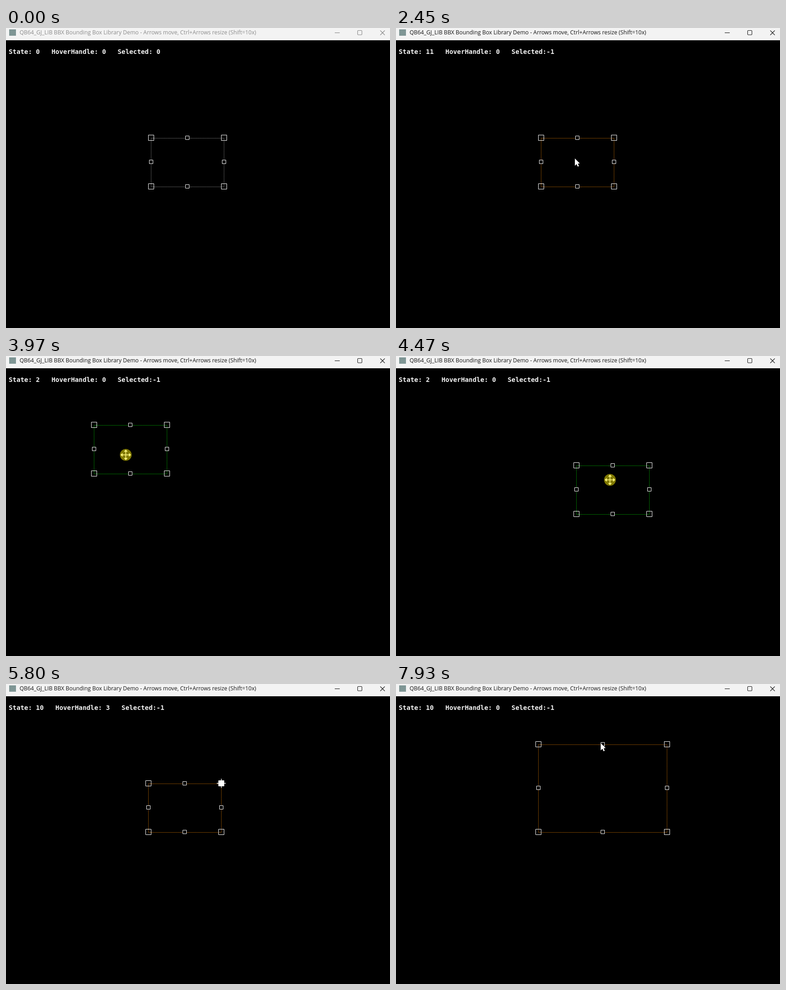
An HTML page with a canvas for the animation above (8000 ms loop, 848 by 660 pixels).

```html
<!DOCTYPE html>
<html lang="en">
<head>
<meta charset="utf-8">
<title>Bounding box demo</title>
<style>
  html, body { margin: 0; width: 100%; height: 100%; overflow: hidden; background: #000; }
  canvas { position: absolute; left: 0; top: 0; }
  #title, #status { position: absolute; line-height: 20px; white-space: pre; }
  #title { left: 30px; top: 0; font-size: 12.3px; font-family: "Open Sans", sans-serif; }
  #status { left: 6px; top: 42px; color: #f4f4f4; font: bold 14.27px/20px "DejaVu Sans Mono", monospace; }
</style>
</head>
<body>
<canvas id="stage" width="848" height="660"></canvas>
<div id="title">QB64_GJ_LIB BBX Bounding Box Library Demo - Arrows move, Ctrl+Arrows resize (Shift=10x)</div>
<div id="status"></div>
<script>
const LOOP = 8000;
const SELECT = 1990, DRAG = 2521, DROP = 5520, RESIZE = 6000, RELEASE = 6750;
const BOX = { width: 161, height: 107 };
const CORNER_START = [475, 218], CORNER_END = [598, 132], BOX_BOTTOM = 325;

const ctx = document.getElementById('stage').getContext('2d');
const title = document.getElementById('title');
const statusLine = document.getElementById('status');

const MODES = {
  idle: { state: 0, color: '#8f8f8f' },
  hover: { state: 1, color: '#e0e0e0', pointer: 'arrow' },
  selected: { state: 10, color: '#d87800', pointer: 'arrow' },
  inside: { state: 11, color: '#d87800', pointer: 'arrow' },
  moving: { state: 2, color: '#00c000', pointer: 'move', pressed: true },
  onHandle: { state: 10, color: '#d87800', pointer: 'cross', handle: 3 },
  resizing: { state: 103, color: '#c800c8', pointer: 'cross', handle: 3, pressed: true },
};
MODES.entering = { ...MODES.idle, pointer: 'arrow' };

const SCRIPT = [
  [0, 'idle'], [200, 'entering'], [1300, 'hover'],
  [SELECT, 'moving'], [2120, 'inside'],
  [DRAG, 'moving'], [DROP, 'inside'],
  [5800, 'onHandle'], [RESIZE, 'resizing'], [RELEASE, 'onHandle'],
  [6890, 'inside'], [7590, 'selected'],
];

const lerp = (a, b, u) => a.map((v, i) => v + (b[i] - v) * u);
const progress = (t, from, to) => Math.min(1, Math.max(0, (t - from) / (to - from)));

// Smooth curve through [time, ...values] keys, at rest at both ends
function track(...keys) {
  const last = keys.length - 1;
  const slope = (i, axis) => i === 0 || i === last ? 0 :
    (keys[i + 1][axis] - keys[i - 1][axis]) / (keys[i + 1][0] - keys[i - 1][0]);
  return time => {
    const t = Math.min(keys[last][0], Math.max(keys[0][0], time));
    const i = Math.max(1, keys.findIndex(k => k[0] >= t)) - 1;
    const a = keys[i], b = keys[i + 1], span = b[0] - a[0], u = (t - a[0]) / span;
    const ease = u * u * (3 - 2 * u);
    return a.map((v, axis) => v + (b[axis] - v) * ease +
      span * u * (1 - u) * (slope(i, axis) * (1 - u) - slope(i + 1, axis) * u)).slice(1);
  };
}

// The box is swung in ellipses: centre x, y and radius x, y over time
const orbit = track(
  [2710, 320, 241, 0, 0],
  [3410, 248, 129, 55, 51],
  [4470, 301, 240, 97, 50],
  [5030, 306, 220, 0, 0],
  [DROP, 314, 218, 0, 0],
);
function boxOrigin(t) {
  const [cx, cy, rx, ry] = orbit(t);
  const angle = (t - 3410) / 848 * Math.PI * 2;
  return [cx + rx * Math.sin(angle), cy + ry * Math.cos(angle)];
}

const boxCorner = t => lerp(CORNER_START, CORNER_END, progress(t, 6130, 6550) ** 1.1);
const approach = track([200, 768, 645], [950, 638, 491], [1440, 394, 288], [2450, 395, 287]);
const toCorner = track([DROP, 393, 263], [5800, ...CORNER_START]);
const depart = track([RELEASE, ...CORNER_END], [7150, 510, 160], [7930, 452, 130]);

// While the button is down, the pointer runs ahead of the box
function pointerAt(t) {
  if (t < DRAG) return approach(t);
  if (t < DROP) {
    const [x, y] = boxOrigin(t + 40);
    return [x + 79, y + 45];
  }
  if (t < RESIZE) return toCorner(t);
  return t < RELEASE ? boxCorner(t + 80) : depart(t);
}

function boxAt(t) {
  const [x, y] = boxOrigin(t).map(Math.round);
  if (t < RESIZE) return [x, y, x + BOX.width, y + BOX.height];
  const [right, top] = boxCorner(t).map(Math.round);
  return [x, top, right, BOX_BOTTOM];
}

function line(...points) {
  ctx.beginPath();
  points.forEach(([x, y]) => ctx.lineTo(x, y));
  ctx.stroke();
}

function polygon(...points) {
  ctx.beginPath();
  points.forEach(([x, y]) => ctx.lineTo(x, y));
  ctx.fill();
}

function drawTitleBar(active) {
  ctx.fillStyle = '#f3f3f3';
  ctx.fillRect(0, 0, 848, 27);
  ctx.fillStyle = '#7f9695';
  ctx.fillRect(7, 3, 15, 14);
  title.style.color = active ? '#161616' : '#8c8c8c';
  ctx.strokeStyle = active ? '#161616' : '#858585';
  ctx.lineWidth = 1.1;
  line([726, 10.5], [737, 10.5]);
  line([826.5, 5.5], [836.5, 15.5]);
  line([836.5, 5.5], [826.5, 15.5]);
  ctx.beginPath();
  ctx.roundRect(776.5, 5.5, 9.5, 9.5, 1.5);
  ctx.stroke();
}

function drawHandle(x, y, half, fill) {
  ctx.beginPath();
  ctx.rect(x + 0.5 - half, y + 0.5 - half, half * 2, half * 2);
  ctx.fillStyle = fill;
  ctx.fill();
  ctx.stroke();
}

function drawBox([left, top, right, bottom], color, activeHandle) {
  const midX = Math.floor((left + right) / 2), midY = Math.floor((top + bottom) / 2);
  ctx.lineWidth = 1;
  ctx.strokeStyle = color;
  ctx.setLineDash([1.15, 1]);
  ctx.strokeRect(left + 0.5, top + 1.5, right - left, bottom - top);
  ctx.setLineDash([]);
  ctx.strokeStyle = '#fff';
  for (const x of [left, midX, right])
    for (const y of [top, midY, bottom]) {
      const onMidX = x === midX, onMidY = y === midY;
      if (onMidX && onMidY) continue;
      const active = activeHandle === 3 && x === right && y === top;
      if (onMidX || onMidY) drawHandle(x, y, 4, '#000');
      else drawHandle(x, y, 6, active ? '#fff' : 'transparent');
    }
}

const pointers = {
  arrow() {
    polygon([0, 0], [0, 16], [3.8, 12.4], [6.4, 18], [9, 16.8], [6.5, 11.4], [11, 11]);
  },
  cross() {
    ctx.lineWidth = 1.5;
    line([-9.5, 0.5], [10.5, 0.5]);
    line([0.5, -9.5], [0.5, 10.5]);
  },
  move() {
    ctx.translate(0.5, 0.5);
    ctx.lineWidth = 1.6;
    for (let i = 0; i < 4; i++) {
      line([0, 0], [8, 0]);
      polygon([11.5, 0], [7, -4.3], [7, 4.3]);
      ctx.rotate(Math.PI / 2);
    }
  },
};

function drawPointer([x, y], shape, pressed) {
  ctx.save();
  ctx.translate(Math.round(x), Math.round(y));
  ctx.fillStyle = ctx.strokeStyle = '#fff';
  ctx.save();
  pointers[shape]();
  ctx.restore();
  if (pressed) {
    ctx.fillStyle = 'rgba(255, 242, 0, 0.5)';
    ctx.beginPath();
    ctx.arc(0.5, 0.5, 13, 0, Math.PI * 2);
    ctx.fill();
  }
  ctx.restore();
}

function render() {
  const t = performance.now() % LOOP;
  const [, modeName] = SCRIPT.findLast(([start]) => start <= t);
  const { state, color, pointer, handle = 0, pressed } = MODES[modeName];
  const selected = t >= SELECT;
  ctx.fillStyle = '#000';
  ctx.fillRect(0, 0, 848, 660);
  drawTitleBar(selected);
  drawBox(boxAt(t), color, handle);
  if (pointer) drawPointer(pointerAt(t), pointer, pressed);
  statusLine.textContent = `State: ${state}   HoverHandle: ${handle}   Selected:${selected ? '-1' : ' 0'}`;
  requestAnimationFrame(render);
}
render();
</script>
</body>
</html>
```
